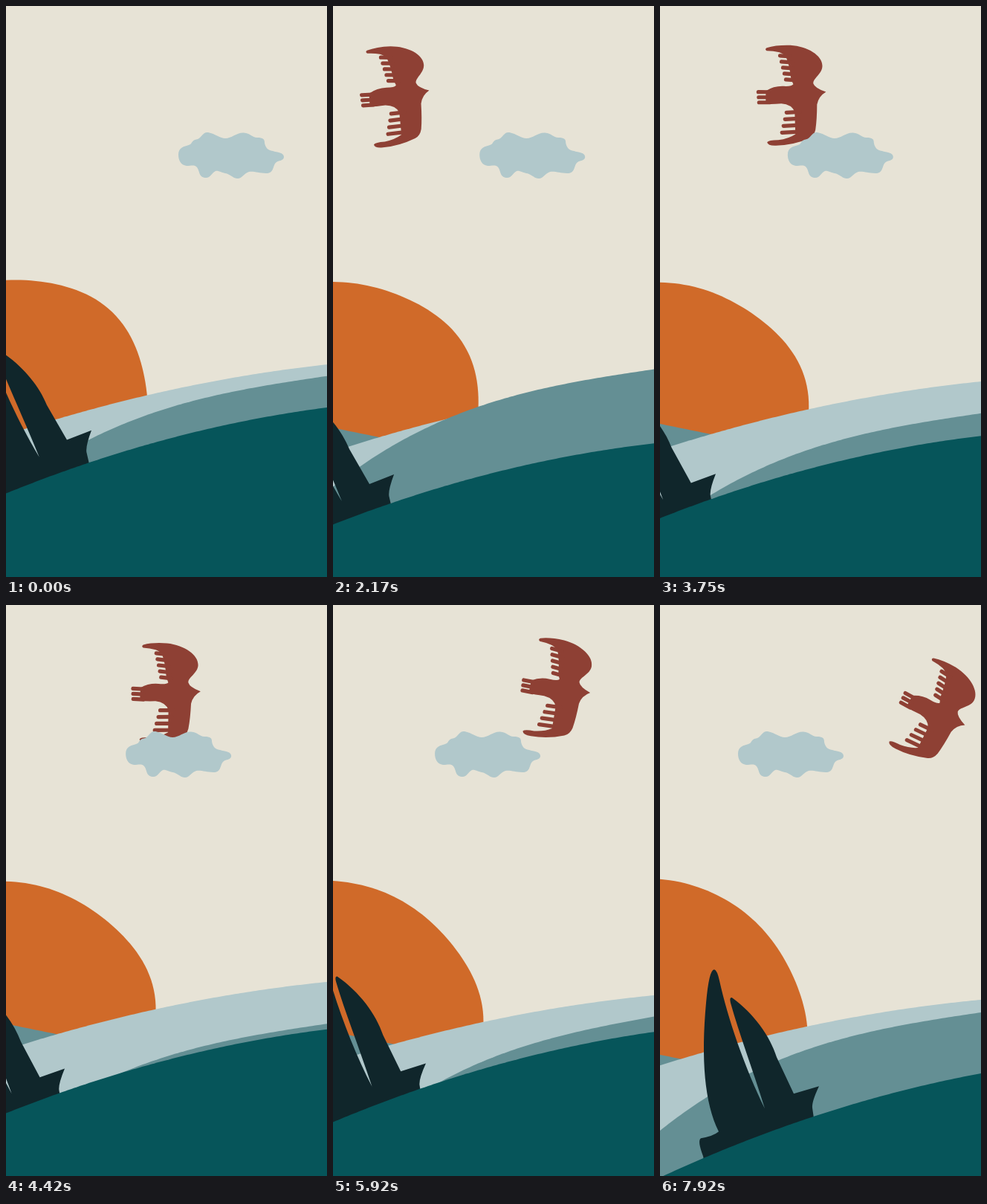
An HTML page with a canvas that plays this animation: 432x768 px, repeating every 8000 ms.

```html
<!DOCTYPE html>
<html>
<head>
<meta charset="utf-8">
<style>
  html, body { margin: 0; width: 100%; height: 100%; overflow: hidden; background: #e7e3d6; }
  canvas { display: block; }
</style>
</head>
<body>
<canvas id="stage" width="432" height="768"></canvas>
<script>
const ctx = document.getElementById('stage').getContext('2d');
const W = 432, H = 768, LOOP = 8000, FRAMES = 96, FPS = 12;
const COLOR = {
  sky: '#e7e3d6', sun: '#d06a29', light: '#b1c8cb', mid: '#648f94',
  front: '#06555a', boat: '#10262b', bird: '#8e4034'
};

const wave = (k, period, peak = 0) => Math.cos(2 * Math.PI * (k - peak) / period);
const bump = (x, center, width) => Math.exp(-(((x - center) / width) ** 2));
const smoothstep = (x, from, to) => {
  const u = Math.min(1, Math.max(0, (x - from) / (to - from)));
  return u * u * (3 - 2 * u);
};

// Smooth curve through a few [x, y] points, evaluated at x.
function spline(points, x) {
  const n = points.length - 1;
  const step = i => points[i + 1][0] - points[i][0];
  const secant = i => (points[i + 1][1] - points[i][1]) / step(i);
  const inner = i => (secant(i - 1) * step(i) + secant(i) * step(i - 1)) / (step(i - 1) + step(i));
  const slope = i => i === 0 ? 2 * secant(0) - inner(1)
    : i === n ? 2 * secant(n - 1) - inner(n - 1) : inner(i);
  let i = 0;
  while (i < n - 1 && x > points[i + 1][0]) i++;
  const h = step(i), u = (x - points[i][0]) / h, v = 1 - u;
  return points[i][1] * v * v * (1 + 2 * u) + points[i + 1][1] * u * u * (3 - 2 * u)
    + h * u * v * (slope(i) * v - slope(i + 1) * u);
}

const birdBody = new Path2D(`M185 115 Q175 121 173 132 Q173 152 171 166
  Q169 175 162 178 Q140 187 118 187.500 Q107 188 106 183 Q108 180 121 180 Q135 178 144 172
  L143 142 Q139 132 125 131 Q112 132 104 131.500 L104 114 Q115 107 128 107.500
  Q139 108 141 105 L138 98 Q136 80 131 68 Q128 64 122 62 Q114 60 105 60 Q102 58 105 56
  Q118 52 137 52.500 C160 54 180 66 180 80 C180 91 167 97 168 104 Q170 110 185 115 Z`);

// Rows of feathers fan out from the tail and from both wings.
const birdFeathers = new Path2D();
function addFeathers(count, tipX, tipY, stepX, stepY, length, droop) {
  for (let i = 0; i < count; i++) {
    const x = tipX + i * stepX, y = tipY + i * stepY;
    birdFeathers.moveTo(x, y);
    birdFeathers.lineTo(x + length, y - droop);
  }
}
addFeathers(5, 123, 66.5, 2, 8, 14, -1);
addFeathers(4, 132, 143, -2, 9, 18, 1);
addFeathers(3, 94, 115.5, 0.5, 7, 14, 0);

const boatShape = new Path2D(`M214 647 Q204 668 205 676 L207 690 L207 725 L62 762
  L58 741 Q50 720 55 717 Q72 714 79 708
  C60 670 55 610 62 535 Q66 490 73 490 Q77 491 80 505
  C91 555 114 622 141 677 C124 622 106 575 95 535
  Q93 527 97 528 C126 549 148 579 157 608 L180 657 Z`);

const cloudShape = new Path2D(`M0 200 C0 190 8 189 14 187 C20 185 16 181 26 179
  C32 176 33 169 40 170 C50 172 56 178 63 178 C72 178 78 170 88 170.500
  C97 171 99 177 106 177 C114 177 116 179 116 184 C117 190 120 194 127 195
  C133 197 142 197 142 203 C142 209 133 207 130 212 C127 217 128 225 118 225
  C108 225 102 222 95 223 C88 225 85 233 79 232 C72 231 70 226 63 225
  C57 224 54 221 50 222 C45 224 43 232 36 231 C27 230 29 222 25 217
  C22 213 17 215 11 215 C3 214 0 207 0 200 Z`);

// Each water layer at step k is a function from x to the height of its crest.
const arc = (right, drop, bulge) => x => {
  const u = (W - x) / W;
  return right + drop * u - 4 * bulge * u * (1 - u);
};
const frontWater = k => arc(
  540 + 0.85 * k + 27 * wave(k, 90, 22.5), 109 + 31 * ((k - 30) / 65) ** 2, 15);
const lightWater = k => arc(488 + 0.47 * k + 6 * wave(k, 54, 25), 95 - 0.07 * k, 12);
const backWater = k => arc(650 + 38 * ((k - 44) / 48) ** 2, -88, 0);
const midWater = k => {
  const right = 506 + 0.0083 * k * k - 34 * wave(k, 76, 16);
  const steepness = 1 + 0.27 * bump(k, 74, 11);
  return x => {
    const u = (W - x) / W;
    return right + steepness * (64 * u + 94 * u ** 3);
  };
};

function drawWater(color, crest) {
  ctx.beginPath();
  ctx.moveTo(0, H);
  for (let x = 0; x <= W; x += 4) ctx.lineTo(x, crest(x));
  ctx.lineTo(W, H);
  ctx.fillStyle = color;
  ctx.fill();
}

// The sun is a disc with soft lobes that turns slowly clockwise.
function drawSun(k) {
  const turn = 46 - 0.64 * k;
  ctx.beginPath();
  ctx.moveTo(0, 640);
  for (let deg = 96; deg >= -16; deg -= 2) {
    const r = 190 - 0.05 * k + 16 * bump(deg, turn, 28) + 8 * bump(deg, turn + 120, 28);
    const a = deg * Math.PI / 180;
    ctx.lineTo(r * Math.cos(a), 560 - r * Math.sin(a));
  }
  ctx.fillStyle = COLOR.sun;
  ctx.fill();
}

// Draws with the pivot moved to (x, y) and everything turned about it.
function place(x, y, degrees, pivotX, pivotY, paint) {
  ctx.save();
  ctx.translate(x, y);
  ctx.rotate(degrees * Math.PI / 180);
  ctx.translate(-pivotX, -pivotY);
  paint();
  ctx.restore();
}

function fillShape(shape, color) {
  ctx.fillStyle = color;
  ctx.fill(shape);
}

const boatPath = [[0, 115], [37, 77], [53, 79], [71, 125], [95, 214]];

function drawBoat(k, water) {
  const x = spline(boatPath, k);
  const y = water(x - 8) - 39 - 6 * wave(k, 118);
  const tilt = 4.8 * (smoothstep(k, 25, 90) - 1);
  place(x, y, tilt, 214, 647, () => fillShape(boatShape, COLOR.boat));
}

function drawBird(k) {
  const dive = Math.max(0, (k - 71) / 24) ** 3;
  const x = -5 + 5.3 * k - 0.005 * k * k - 43 * dive;
  const y = 111 + 0.1 * k + 41 * dive;
  const turn = -5 + 33.5 * (k / 95) ** 2.5;
  place(x, y, turn, 185, 115, () => {
    fillShape(birdBody, COLOR.bird);
    ctx.strokeStyle = COLOR.bird;
    ctx.lineWidth = 5.2;
    ctx.lineCap = 'round';
    ctx.stroke(birdFeathers);
  });
}

function draw(k) {
  const front = frontWater(k);
  ctx.fillStyle = COLOR.sky;
  ctx.fillRect(0, 0, W, H);
  drawSun(k);
  drawWater(COLOR.mid, backWater(k));
  drawWater(COLOR.light, lightWater(k));
  drawWater(COLOR.mid, midWater(k));
  drawBoat(k, front);
  drawWater(COLOR.front, front);
  drawBird(k);
  place(232 - 1.337 * k, 0, 0, 0, 0, () => fillShape(cloudShape, COLOR.light));
}

const start = performance.now();
function tick() {
  const t = (performance.now() - start) % LOOP;
  draw(Math.min(FRAMES - 1, Math.floor((t + 4) * FPS / 1000)));
  requestAnimationFrame(tick);
}
tick();
</script>
</body>
</html>
```
